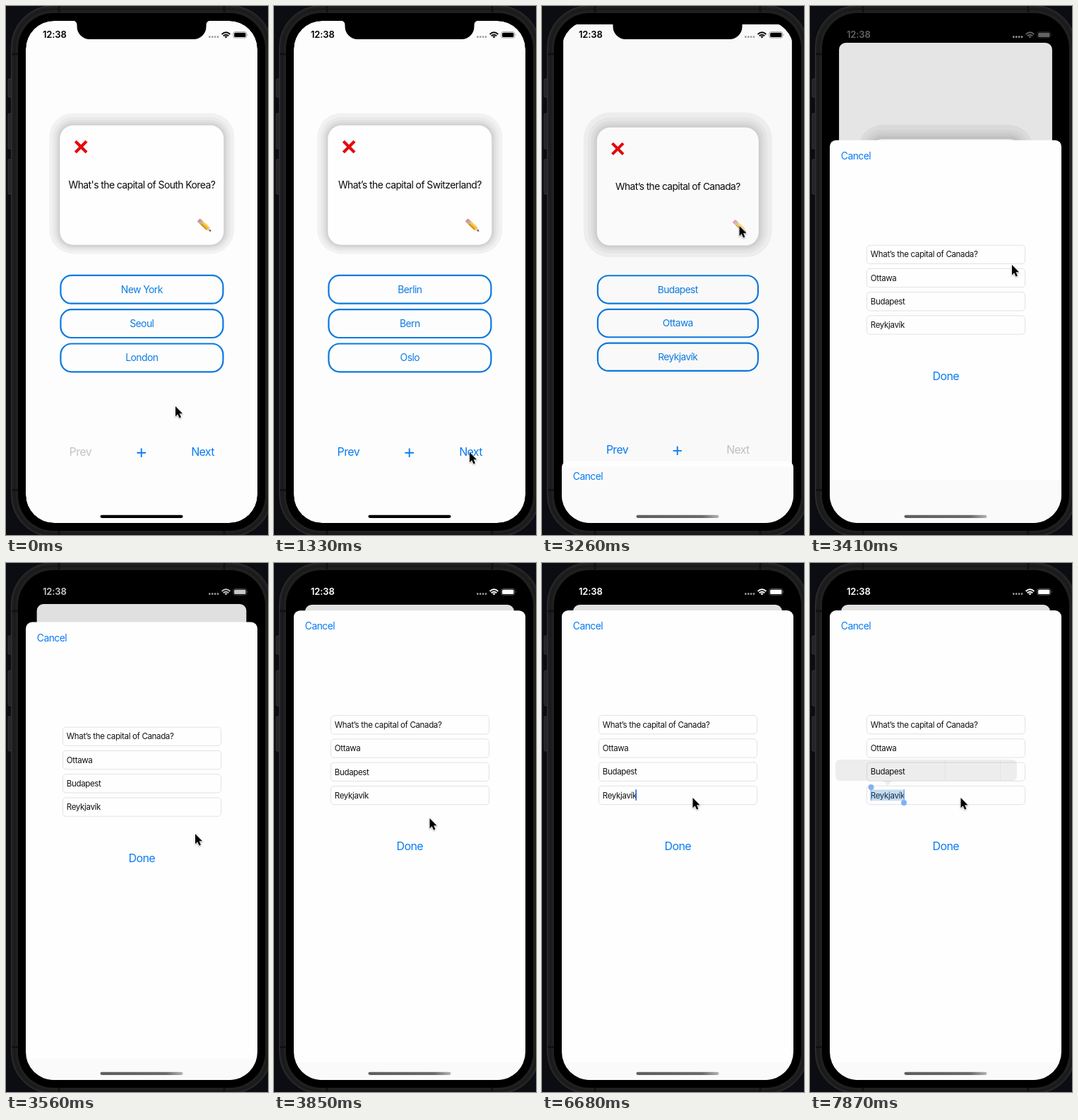
These frames come from a looping animation (371 px wide and 748 px high, 8 s). An HTML page:

```html
<!DOCTYPE html>
<html lang="en">
<head>
<meta charset="utf-8">
<title>Quiz cards</title>
<style>
  html, body { margin: 0; width: 100%; height: 100%; overflow: hidden; background: #0b0d12; }
  svg { display: block; width: 371px; height: 748px; }
  text { font-family: Inter, "Liberation Sans", sans-serif; font-size: 13.9px; letter-spacing: -.04em; white-space: pre; }
  .mid { text-anchor: middle; }
  .blue { fill: #087cf2; }
  .big { font-size: 16px; }
  .field text { font-size: 11.5px; letter-spacing: -.029em; fill: #111; }
  .field rect { fill: #fefefe; stroke: #e2e2e4; }
  .answer rect { fill: none; stroke: #0a79e0; stroke-width: 2.2; }
  .answer text { fill: #0c7ce2; }
  #time { font-size: 13px; font-weight: 600; letter-spacing: -.01em; }
</style>
</head>
<body>
<svg viewBox="0 0 371 748">
  <defs>
    <clipPath id="screen"><rect x="28" y="21" width="328" height="710" rx="40"/></clipPath>
    <linearGradient id="bar">
      <stop offset="0" stop-color="#5e5e5e"/><stop offset=".8" stop-color="#6a6a6a"/><stop offset="1" stop-color="#b4b4b4"/>
    </linearGradient>
  </defs>

  <!-- phone body -->
  <g fill="#242428" stroke="#3a3a3e" stroke-width=".8">
    <rect x="3" y="103" width="6" height="26" rx="1.5"/>
    <rect x="3" y="152" width="6" height="50" rx="1.5"/>
    <rect x="3" y="217" width="6" height="49" rx="1.5"/>
  </g>
  <rect x="7.5" y="-.5" width="369" height="751" rx="59" fill="#202021" stroke="#333335"/>
  <rect x="12" y="4.5" width="360" height="742" rx="55" fill="none" stroke="#1a1a1b" stroke-width="3"/>
  <path d="M8 68H17M8 684.5H17M75 0V9M309 0V9M75 742V748M309 742V748" stroke="#111112" stroke-width="3"/>
  <rect x="17" y="10" width="350" height="732" rx="50" fill="#000"/>

  <g clip-path="url(#screen)">
    <g id="sheet">
      <rect id="page" x="28" y="21" width="328" height="710" fill="#fdfdfd"/>
      <g id="shadow"></g>
      <rect x="76.3" y="168.7" width="232" height="169" rx="19" fill="#fefefe"/>
      <path d="M98.3 191.3 114 207M114 191.3 98.3 207" stroke="#e40a0a" stroke-width="4.2"/>
      <text id="question" class="mid" x="192.4" y="258.4" fill="#0a0a0a"></text>
      <g id="pencil" transform="translate(272.6 302.4) rotate(43)">
        <path d="M1.5-3H4V3H1.5Q0 3 0 1.5V-1.5Q0-3 1.5-3Z" fill="#e58a91"/>
        <path d="M4-3H6.5V3H4Z" fill="#a9adb3"/>
        <path d="M6.5-3H18V3H6.5Z" fill="#f3b52c"/>
        <path d="M6.5-3H18V-1H6.5Z" fill="#f9d25c"/>
        <path d="M6.5 1.2H18V3H6.5Z" fill="#d98a1c"/>
        <path d="M18-3 24 0 18 3Z" fill="#e9c79b"/>
        <path d="M21.5-1.3 24.4 0 21.5 1.3Z" fill="#333"/>
      </g>
      <g id="answers"></g>
      <text id="prev" class="mid big" x="105.3" y="636">Prev</text>
      <path d="M185.4 631.7H198M191.7 625.4V638" stroke="#0a7cf0" stroke-width="1.9"/>
      <text id="next" class="mid big" x="278.5" y="636">Next</text>
      <rect id="dim" x="28" y="21" width="328" height="710"/>
    </g>

    <g id="modal">
      <rect x="28" width="328" height="720" rx="9" fill="#fefefe"/>
      <path id="band" fill="#fafafa"/>
      <text class="blue" x="43.8" y="27">Cancel</text>
      <g id="fields"></g>
      <text class="mid big blue" x="192.3" y="339">Done</text>
    </g>

    <rect id="caret" x="132.4" y="320.3" width="1.6" height="15.4" fill="#2468d8"/>
    <g id="select">
      <path d="M43 278H286Q293 278 293 285V301Q293 308 286 308H116.500L110 315 103.500 308H43Q36 308 36 301V285Q36 278 43 278Z" fill="#000" opacity=".065"/>
      <path d="M191.500 279V307M269.500 279V307" stroke="#000" opacity=".03"/>
      <rect x="86" y="320.500" width="48" height="15.500" fill="#2d7fd0" opacity=".28"/>
      <path d="M86.300 317V336M133.300 320V339" stroke="#84b2ee" stroke-width="1.5"/>
      <circle cx="86.500" cy="317" r="4" fill="#84b2ee"/>
      <circle cx="133" cy="339" r="4" fill="#84b2ee"/>
    </g>
    <rect id="home" x="133.500" y="719.700" width="117" height="4.300" rx="2.150"/>
  </g>

  <path d="M94 20.500Q100.500 21 100.500 27V29A18 18 0 0 0 118.500 47H265.500A18 18 0 0 0 283.500 29V27Q283.500 21 290 20.500Z"/>
  <g id="status">
    <text id="time" x="52" y="45.300">12:38</text>
    <path d="M288.300 43.700H302" stroke="#9a9a9c" stroke-width="2.800" stroke-linecap="round" stroke-dasharray="0 3.900"/>
    <g fill="none" stroke="currentColor" stroke-width="1.900">
      <path d="M305.600 40Q311.500 34.700 317.400 40M307.700 42.300Q311.500 39 315.300 42.300"/>
      <path d="M309.400 43.300Q311.500 41.700 313.600 43.300L311.500 45.600Z" fill="currentColor" stroke="none"/>
    </g>
    <rect x="321.800" y="36.500" width="18.900" height="8.700" rx="2.600" fill="none" stroke="currentColor" stroke-width=".8" opacity=".45"/>
    <rect x="323.100" y="37.800" width="16.300" height="6.100" rx="1.500" fill="currentColor"/>
    <path d="M341.900 39.300Q343.200 40.800 341.900 42.500Z" fill="currentColor" opacity=".5"/>
  </g>

  <path id="cursor" d="M0 0V14.200L3.200 11.200 5.500 16.500 7.900 15.400 5.600 10.300H10Z" stroke="#fff" stroke-width="1.100" paint-order="stroke" style="filter:drop-shadow(0 1px 1px #0005)"/>
</svg>

<script>
const LOOP = 8000, STEP = 148.5, LEAD = 14;
const REST = 67, TRAVEL = 664, OPEN = 22;

const cards = [
  { from: 0, q: "What's the capital of South Korea?", a: ["New York", "Seoul", "London"] },
  { from: 9, q: "What’s the capital of Switzerland?", a: ["Berlin", "Bern", "Oslo"] },
  { from: 13, q: "What’s the capital of Canada?", a: ["Budapest", "Ottawa", "Reykjavík"] }
];

// Step tables: [tick, value...], each held until the next entry.
const pointer = [
  [0, 240, 566], [1, 240.6, 566.3], [3, 243, 570], [4, 252, 584], [5, 262, 603],
  [6, 271, 621], [7, 276, 630], [8, 277, 631], [17, 277, 625], [18, 278, 590],
  [19, 279, 500], [20, 280, 385], [21, 280, 318], [22, 279.5, 311], [23, 286, 366],
  [24, 268, 383], [25, 235, 371], [26, 220.5, 361], [28, 212.5, 343], [29, 213.5, 332]
];
const blink = [
  [0, 0], [31, 1], [35, .5], [36, 0], [37, .5], [38, 1], [42, 0],
  [44, .5], [45, 1], [48, .5], [49, 0], [51, 1], [53, 0]
];

const $ = id => document.getElementById(id);
const set = (id, attrs) => { for (const k in attrs) $(id).setAttribute(k, attrs[k]); };
const held = (table, n) => table.findLast(row => row[0] <= n);

$("answers").innerHTML = [0, 1, 2].map(i => `<g class="answer" transform="translate(0 ${i * 48.3})">
  <rect x="77.4" y="380.9" width="230" height="39.8" rx="15.5"/>
  <text class="mid" x="192.3" y="405.5"></text></g>`).join("");
const answers = [...document.querySelectorAll(".answer text")];

const last = cards[2];
$("fields").innerHTML = [last.q, last.a[1], last.a[0], last.a[2]].map((s, i) =>
  `<g class="field" transform="translate(0 ${148.5 + i * 33.25})">
  <rect x="80.5" y="0" width="224" height="26.3" rx="4.5"/>
  <text x="85.8" y="17.3">${s}</text></g>`).join("");

const rings = [[15, 241, -2.3], [10, 233, -1.5], [6.5, 225, -1], [4, 217, -.5], [2, 209, 0]];
function drawShadow(k) {
  $("shadow").innerHTML = rings.map(([d, g, dy]) => {
    const r = d * k;
    return `<rect x="${76.3 - r}" y="${168.7 - r + dy}" width="${232 + 2 * r}" height="${169 + 2 * r}" rx="${19 + r}" fill="rgb(${g},${g},${g})"/>`;
  }).join("");
}

// Critically damped spring: 1 when closed, 0 when fully open.
function spring(n) {
  if (n < OPEN) return 1;
  const u = .63 + (n - OPEN) * 2.47;
  return (1 + u) * Math.exp(-u);
}

function draw(n) {
  const card = cards.findLast(c => c.from <= n);
  const open = n >= OPEN, gap = spring(n), p = 1 - gap;
  $("question").textContent = card.q;
  answers.forEach((el, i) => el.textContent = card.a[i]);
  set("prev", { fill: n < 9 ? "#c3c3c5" : "#087cf2" });
  set("next", { fill: n < 13 ? "#087cf2" : "#c3c3c5", opacity: n === 8 || n === 12 ? .6 : 1 });
  set("pencil", { opacity: n === 21 ? .4 : n === 22 ? .75 : 1 });

  drawShadow(open ? 1.28 : 1);
  set("page", { rx: open ? 10.5 : 40 });
  set("sheet", { transform: `translate(192 ${21 + 38 * p}) scale(${1 - .098 * p}) translate(-192 -21)` });
  set("dim", { opacity: open ? .115 * p : 0, rx: 10.5 });

  const off = gap * TRAVEL, top = REST + off;
  const bandTop = Math.max(9, 706 - .29 * off - top);
  set("modal", { transform: `translate(0 ${top})`, visibility: open ? "visible" : "hidden" });
  set("band", { d: `M28 ${bandTop}H356V720H28Z` });
  set("home", { fill: open ? "url(#bar)" : "#000" });

  const level = Math.round(255 * Math.min(1, Math.max(0, (n - OPEN) * .39)));
  const ink = `rgb(${level},${level},${level})`;
  set("status", { color: ink, fill: ink });

  set("caret", { opacity: held(blink, n)[1] });
  set("select", { visibility: n >= 53 ? "visible" : "hidden" });
  const [, x, y] = held(pointer, n);
  set("cursor", { transform: `translate(${x} ${y})` });
}

const start = performance.now();
let shown = -1;
function tick() {
  const t = (performance.now() - start) % LOOP;
  const n = Math.floor((t + LEAD) / STEP);
  if (n !== shown) draw(shown = n);
  requestAnimationFrame(tick);
}
tick();
</script>
</body>
</html>
```
